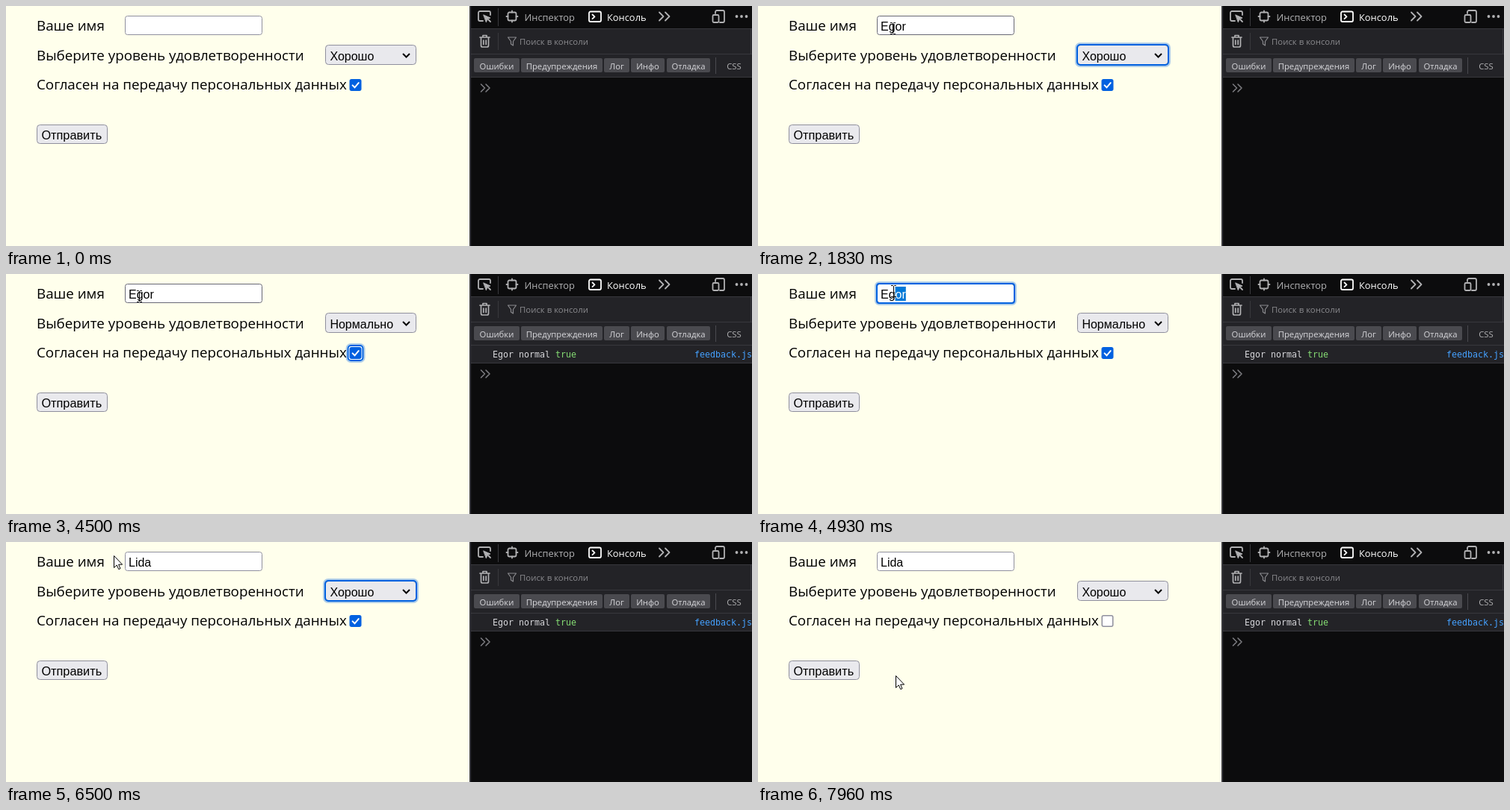
Recreate the animation shown at these times as an HTML page. Size 998 by 322 pixels, loop 8000 ms.

```html
<!DOCTYPE html>
<html lang="ru">
<head>
<meta charset="utf-8">
<title>Форма отзыва</title>
<style>
html, body { margin: 0; width: 100%; height: 100%; overflow: hidden; background: #ffffec; }
svg { display: block; width: 998px; height: 322px; }
text { white-space: pre; }
.label { font: 18.78px "Open Sans", "Noto Sans", sans-serif; }
.field { font: 16px "Liberation Sans", Arial, sans-serif; }
.tab { font: 12.85px "Open Sans", "Noto Sans", sans-serif; fill: #b1b1b3; }
.small { font: 11.3px "Open Sans", "Noto Sans", sans-serif; fill: #d7d7db; text-anchor: middle; }
.mono { font: 11.63px "DejaVu Sans Mono", monospace; fill: #d7d7db; }
.icon { fill: none; stroke: #b1b1b3; stroke-width: 1.8; stroke-linejoin: round; stroke-linecap: round; }
.rule { stroke: #38383d; }
.ring { fill: none; stroke: #0061e0; stroke-width: 2; }
.ring .halo { stroke-opacity: .32; }
</style>
</head>
<body>
<svg viewBox="0 0 998 322" xmlns="http://www.w3.org/2000/svg">
  <rect width="998" height="322" fill="#ffffec"/>

  <g class="label">
    <text x="41" y="33">Ваше имя</text>
    <text x="41" y="73">Выберите уровень удовлетворенности</text>
    <text x="41" y="112">Согласен на передачу персональных данных</text>
  </g>

  <rect id="input" x="159.5" y="13.5" width="183" height="25" rx="3" fill="#fff"/>
  <g id="inputRing" class="ring"></g>
  <text id="name" class="field" x="164" y="33"></text>
  <rect id="selBox" y="17" height="19" fill="#0078d7"/>
  <text id="selText" class="field" y="33" fill="#fff"></text>
  <rect id="caret" y="17" width="1" height="19"/>

  <rect x="427.5" y="52.5" width="121" height="26" rx="4" fill="#e9e9ed" stroke="#8f8f9d"/>
  <g id="selectRing" class="ring"></g>
  <text id="level" class="field" x="433.4" y="73"></text>
  <path d="M531 64l4.5 4.5 4.5-4.5" fill="none" stroke="#000" stroke-width="2"/>

  <g id="checkRing" class="ring"></g>
  <rect id="check" x="460.25" y="98.75" width="14.5" height="14.5" rx="2" stroke-width="1.5"/>
  <path id="tick" d="M463.6 106.4l2.9 2.9 5.2-6.2" fill="none" stroke="#fff" stroke-width="2" stroke-linecap="round"/>

  <rect x="41.5" y="159.5" width="94" height="25" rx="4" fill="#e9e9ed" stroke="#8f8f9d"/>
  <text class="field" x="47.4" y="179" style="font-size:16.3px">Отправить</text>

  <rect x="620" width="378" height="322" fill="#0c0c0d"/>
  <rect x="620" width="2" height="322" fill="#38383d"/>
  <rect x="622" y="31" width="376" height="64" fill="#232327"/>
  <path class="rule" d="M622 30.5H998M622 64.5H998M622 95.5H998M658.5 3V27M658.5 36V59M996.5 31V64"/>
  <path stroke="#4a4a4f" d="M949.5 69V91"/>

  <g class="icon">
    <path d="M638 20H634a2 2 0 0 1-2-2V9a2 2 0 0 1 2-2H646a2 2 0 0 1 2 2V12"/>
    <path d="M639 12l9 4-4 1.5-1.5 4z" fill="#b1b1b3" stroke-width="1"/>
    <path d="M645 18l3 3"/>
    <rect x="671.5" y="8.5" width="11" height="11" rx="2"/>
    <path d="M677 6.5V8.5M677 19.5V21.5M669.5 14H671.5M682.5 14H684.5"/>
    <path d="M874 8.5l5.5 5.5-5.5 5.5M882 8.5l5.5 5.5-5.5 5.5"/>
    <path d="M949 10V8a2 2 0 0 1 2-2h8a2 2 0 0 1 2 2v12a2 2 0 0 1-2 2h-4"/>
    <rect x="945.5" y="12" width="8" height="10" rx="1.5"/>
    <path d="M634 42H647M638 41.5V39.5H643V41.5M635.5 43V53a2 2 0 0 0 2 2h6a2 2 0 0 0 2-2V43M638.8 46V51.5M642.2 46V51.5" stroke-width="1.7"/>
    <path d="M671.5 42H682.5L678.5 47.5V53L675.5 51V47.5z" stroke="#8a8a8e" stroke-width="1.2"/>
  </g>
  <g fill="#b1b1b3">
    <circle cx="977.5" cy="14" r="1.9"/><circle cx="984" cy="14" r="1.9"/><circle cx="990.5" cy="14" r="1.9"/>
  </g>
  <g class="icon" style="stroke:#fff">
    <rect x="780" y="7.5" width="16" height="13.5" rx="2"/>
    <path d="M784.5 11.5l3 2.8-3 2.8"/>
  </g>
  <text class="tab" x="693.5" y="19.5">Инспектор</text>
  <text class="tab" x="804" y="19.5" style="fill:#fff">Консоль</text>
  <text class="tab" x="687" y="52" style="font-size:11.4px;fill:#8a8a8e">Поиск в консоли</text>
  <g id="filters"></g>
  <text class="small" x="974" y="84.5" style="fill:#b1b1b3">CSS</text>

  <g id="log">
    <rect x="622" y="96" width="376" height="23" fill="#232327"/>
    <path class="rule" d="M622 119.5H998"/>
    <text class="mono" x="651" y="112">Egor normal <tspan fill="#86de74">true</tspan></text>
    <text class="mono" x="921" y="112" style="fill:#45a1ff">feedback.js</text>
  </g>
  <path id="prompt" class="icon" style="stroke:#7c7c80;stroke-width:1.6" d="M635.5 105l5 5-5 5M642 105l5 5-5 5"/>

  <path id="arrow" d="M.5 .5V16.5L4.2 13 6.8 18.6 9 17.6 6.6 12.2H11.6z" fill="#fff" stroke="#000"/>
  <path id="beam" d="M-3.5 -7.5H-1L0 -6.5 1 -7.5H3.5M0 -6.5V6.5M-3.5 7.5H-1L0 6.5 1 7.5H3.5" fill="none" stroke="#000"/>
</svg>
<script>
const LOOP = 8000, TEXT_X = 164;
const FIRST = "Egor", SECOND = "Lida";
const $ = Object.fromEntries([...document.querySelectorAll("[id]")].map(e => [e.id, e]));

// Pointer track: time, x, y
const track = [
  [230, 156, 0], [430, 181, 31], [900, 181, 31], [930, 180, 30],
  [4470, 180, 30], [4500, 178, 30], [4660, 206, 27], [4760, 206, 27],
  [5160, 148, 18], [5299, 148, 18], [5300, 144, 18], [7070, 144, 18],
  [7230, 262, 92], [7360, 308, 108], [7700, 308, 108], [7900, 308, 164], [7960, 184, 179]
];

// Time each character is typed
const firstKeys = [1060, 1200, 1330, 1530];
const secondKeys = [5600, 5800, 5870, 5930];

const show = (el, on) => el.setAttribute("display", on ? "inline" : "none");
const set = (el, attrs) => { for (const k in attrs) el.setAttribute(k, attrs[k]); };
const within = (t, a, b) => t >= a && t < b;
const typed = (word, keys, t) => word.slice(0, keys.filter(k => t >= k).length);

function box(cls, x, y, w, h, grow, r) {
  return `<rect class="${cls}" x="${x - grow}" y="${y - grow}" width="${w + 2 * grow}" height="${h + 2 * grow}" rx="${r}"/>`;
}
function ring(el, x, y, w, h, r) {
  el.innerHTML = box("halo", x, y, w, h, 2, r + 2) + box("edge", x, y, w, h, 0, r);
}
ring($.inputRing, 159, 13, 184, 26, 3);
ring($.selectRing, 427, 52, 122, 27, 4);
ring($.checkRing, 457.5, 96, 20, 20, 4);
$.checkRing.lastChild.style.fill = "#fff";

$.filters.innerHTML = [
  ["Ошибки", 626, 687], ["Предупреждения", 689, 798], ["Лог", 800, 834],
  ["Инфо", 836, 881], ["Отладка", 884, 942]
].map(([s, a, b]) =>
  `<rect x="${a}" y="70" width="${b - a}" height="19" rx="2" fill="#4a4a4f"/>` +
  `<text class="small" x="${(a + b) / 2}" y="84.5">${s}</text>`).join("");

function pointer(t) {
  const i = track.findIndex(p => p[0] > t);
  if (i < 0) return track[track.length - 1].slice(1);
  if (!i) return track[0].slice(1);
  const [t0, x0, y0] = track[i - 1], [t1, x1, y1] = track[i];
  const k = (t - t0) / (t1 - t0);
  return [x0 + (x1 - x0) * k, y0 + (y1 - y0) * k].map(Math.round);
}

const width = n => n ? $.name.getSubStringLength(0, n) : 0;

function drawName(t, x) {
  const word = t < 5600 ? typed(FIRST, firstKeys, t) : typed(SECOND, secondKeys, t);
  $.name.textContent = word;
  let from = word.length;
  const dragging = within(t, 4760, 5600);
  if (dragging) while (from > 0 && x < TEXT_X + (width(from - 1) + width(from)) / 2) from--;
  const start = TEXT_X + width(from), end = TEXT_X + width(word.length);
  const selected = from < word.length;
  show($.selBox, selected);
  set($.selBox, { x: start, width: end - start });
  $.selText.textContent = word.slice(from);
  set($.selText, { x: start });
  return { selected, end };
}

function draw(t) {
  const [x, y] = pointer(t);
  const beam = within(t, 325, 5300);
  show($.beam, beam);
  show($.arrow, t >= 230 && !beam);
  set($.beam, { transform: `translate(${x + .5} ${y})` });
  set($.arrow, { transform: `translate(${x} ${y})` });

  const { selected, end } = drawName(t, x);
  const inputFocus = within(t, 800, 1830) || within(t, 4730, 6200);
  const overInput = t >= 230 && within(x, 159, 343) && within(y, 13, 39);
  set($.input, { stroke: overInput ? "#676774" : "#8f8f9d" });
  show($.inputRing, inputFocus);
  show($.caret, inputFocus && !selected);
  set($.caret, { x: Math.round(end) });

  show($.selectRing, within(t, 1830, 2560) || within(t, 6200, 7530));
  $.level.textContent = within(t, 2100, 6500) ? "Нормально" : "Хорошо";

  const checked = t < 7530;
  const overLabel = within(x, 41, 480) && within(y, 90, 120);
  show($.checkRing, within(t, 2560, 4730));
  show($.tick, checked);
  const blue = overLabel ? "#2374f8" : "#0061e0";
  set($.check, {
    fill: checked ? blue : "#fff",
    stroke: checked ? blue : overLabel ? "#676774" : "#8f8f9d"
  });

  const logged = t >= 3000;
  show($.log, logged);
  set($.prompt, { transform: `translate(0 ${logged ? 24 : 0})` });
}

const begin = performance.now();
function tick() {
  draw((performance.now() - begin) % LOOP);
  requestAnimationFrame(tick);
}
tick();
</script>
</body>
</html>
```
